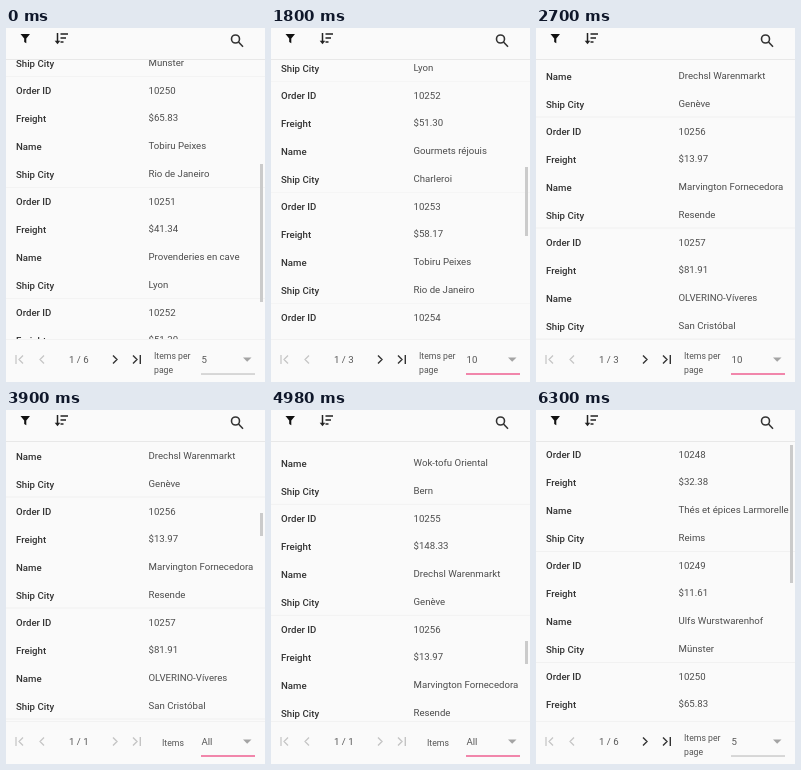
These frames come from a looping animation (259x354 px, 6.36 s). An HTML page:

```html
<!DOCTYPE html>
<html lang="en">
<head>
<meta charset="utf-8">
<title>Orders</title>
<style>
html, body { margin: 0; width: 100%; height: 100%; overflow: hidden; }
body { position: relative; background: #fafafa; color: #333; font: 9.65px Roboto, sans-serif; }
#grid { position: absolute; left: 0; top: 31px; width: 259px; height: 280px; overflow: hidden; }
.record { height: 111px; box-sizing: border-box; box-shadow: inset 0 -1px #f1f1f1; }
.row { display: flex; height: 27.75px; line-height: 27.75px; white-space: nowrap; }
.row b { position: relative; top: .4px; width: 132.5px; margin-left: 10px; font-weight: 500; }
.row span { position: relative; top: -.5px; color: #4c4c4c; }
#thumb { position: absolute; left: 254px; width: 2.5px; background: #cbcbcb; }
svg { position: absolute; left: 0; top: 0; }
.text { position: absolute; line-height: 0; white-space: nowrap; color: #555; }
.small { font-size: 8.7px; }
#popup { position: absolute; left: 183px; top: 179px; width: 76px; height: 178px; background: #fff; box-shadow: 0 1px 5px #0003; }
#popup div { height: 35.5px; line-height: 35.5px; padding-left: 12px; color: #444; }
#popup .on { background: #eee; color: #e3165b; }
</style>
</head>
<body>
<div id="grid"><div id="rows"></div></div>
<div id="thumb"></div>
<svg width="259" height="354" fill="none">
  <path d="M0 31.5H259" stroke="#e8e8e8"/>
  <path d="M0 311.5H259" stroke="#f2f2f2"/>
  <path d="M14.5 6H24L20.3 10.5V15.2L18.2 14V10.5Z" fill="#111"/>
  <path d="M51.5 5V14M54.5 6H62M54.5 10H60M54.5 14H57.5" stroke="#222" stroke-width="1.5"/>
  <path d="M48.7 12.8H54.3L51.5 16.3Z" fill="#222"/>
  <g stroke="#333" stroke-width="1.6"><circle cx="229.5" cy="11" r="4"/><path d="M232.5 14L237 18.7"/></g>
  <path d="M10 327V336M17 327.5L13 331.5L17 335.5M38 327.5L34 331.5L38 335.5" stroke="#c4c4c4" stroke-width="1.2"/>
  <path id="next" d="M107 327.5L111 331.5L107 335.5M127 327.5L131 331.5L127 335.5M134.3 327V336" stroke-width="1.4"/>
  <path d="M237 329.5H245.5L241.2 333.7Z" fill="#a4a4a4"/>
  <path id="underline" d="M195 346H249"/>
</svg>
<div class="text" id="page" style="left:63px;top:331.5px"></div>
<div class="text small" id="items" style="left:148px;top:328px">Items per</div>
<div class="text small" id="items2" style="left:148px;top:341.5px">page</div>
<div class="text" id="size" style="left:195.5px;top:331.5px"></div>
<div id="popup"></div>
<script>
const $ = id => document.getElementById(id);
const LOOP = 6360, STEP = 60, RECORD = 111, VIEW = 280, TRACK = 274;

const orders = `32.38|Thés et épices Larmorelle|Reims
11.61|Ulfs Wurstwarenhof|Münster
65.83|Tobiru Peixes|Rio de Janeiro
41.34|Provenderies en cave|Lyon
51.30|Gourmets réjouis|Charleroi
58.17|Tobiru Peixes|Rio de Janeiro
22.98|Wok-tofu Oriental|Bern
148.33|Drechsl Warenmarkt|Genève
13.97|Marvington Fornecedora|Resende
81.91|OLVERINO-Víveres|San Cristóbal
140.51|Knupf Kontor|Graz
3.25|Almacén familiar Tezolpa|México D.F.
55.09|Lisbeths Kornladen|Köln
3.05|Que Ternura|Rio de Janeiro
48.29|Juniper Gulch Pantry Goods|Albuquerque`.split('\n').map((line, i) => {
  const [freight, name, city] = line.split('|');
  return { 'Order ID': 10248 + i, Freight: '$' + freight, Name: name, 'Ship City': city };
});

const recordHtml = order => '<div class="record">' + Object.entries(order)
  .map(([label, value]) => `<div class="row"><b>${label}</b><span>${value}</span></div>`).join('') + '</div>';
$('rows').innerHTML = [...orders, ...orders].map(recordHtml).join('');

const choices = ['All', '5', '10', '12', '20'];
$('popup').innerHTML = choices.map(c => `<div>${c}</div>`).join('');

// Scroll flings: start and end time, start and end offset, time the scrollbar is gone
const flings = [
  [-60, 105, 0, 274.5, 420],
  [1740, 2360, 274.5, 829.5, 2700],
  [3900, 4500, 831.5, 1700, 5000],
  [4560, 5160, 1700, 2397, 5400],
  [5520, 5760, 2397, 3050, 5940]
];

// Page size menus: opening, picking and closing time, choice before and after
const menus = [
  { open: 780, pick: 1200, close: 1380, from: '5', to: '10' },
  { open: 2880, pick: 3420, close: 3600, from: '10', to: 'All' }
];

const clamp = x => Math.max(0, Math.min(1, x));

function draw(t) {
  const done = menus.filter(m => t >= m.close);
  const size = done.length ? done[done.length - 1].to : '5';
  const all = size === 'All';
  const count = all ? 30 : +size;

  const [start, end, from, to, gone] = flings.filter(f => t >= f[0]).pop();
  const scroll = from + (to - from) * (1 - (1 - clamp((t - start) / (end - start))) ** 3);
  const content = count * RECORD;
  $('rows').style.transform = `translateY(${-scroll}px)`;
  $('thumb').style.top = 35 + scroll / content * TRACK + 'px';
  $('thumb').style.height = VIEW / content * TRACK + 'px';
  $('thumb').style.opacity = clamp((gone - t) / 240);

  $('page').textContent = `1 / ${30 / count}`;
  $('size').textContent = size;
  $('items').textContent = all ? 'Items' : 'Items per';
  $('items').style.left = all ? '156px' : '148px';
  $('items').style.top = all ? '332.5px' : '328px';
  $('items2').hidden = all;
  $('next').setAttribute('stroke', all ? '#c4c4c4' : '#333');
  const focused = t > menus[0].open;
  $('underline').setAttribute('stroke', focused ? '#ee5f90' : '#b4b4b4');
  $('underline').setAttribute('stroke-width', focused ? 1.5 : 1);

  const menu = menus.find(m => t >= m.open && t < m.close);
  $('popup').hidden = !menu;
  if (!menu) return;
  $('popup').style.opacity = Math.min(clamp((t - menu.open + 180) / 300), clamp((menu.close - t) / 120));
  const selected = t < menu.pick ? menu.from : menu.to;
  [...$('popup').children].forEach((item, i) => item.classList.toggle('on', choices[i] === selected));
}

const origin = performance.now();
function tick() {
  const time = Math.max(0, performance.now() - origin);
  draw((Math.floor(time / STEP) * STEP + 60) % LOOP - 60);
  requestAnimationFrame(tick);
}
tick();
</script>
</body>
</html>
```
